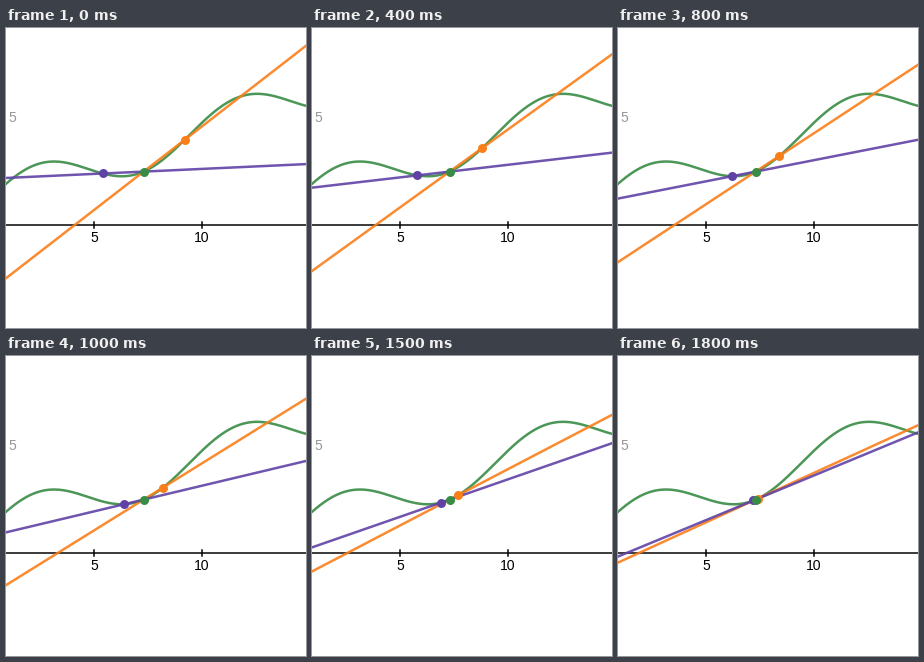
A matplotlib script that plays this animation: 300 px wide and 300 px high, repeating every 1900 ms.

```python
import numpy as np
import matplotlib.pyplot as plt
from matplotlib.animation import FuncAnimation

SIZE, DPI = 300, 100
PT = 72 / DPI                      # points per pixel
FRAMES, INTERVAL = 19, 100
UNIT, X0, Y0 = 21.55, -19.7, 196.3  # pixels per unit, position of the origin
ANCHOR = 7.3
GREEN, PURPLE, ORANGE = "#388c46", "#6042a6", "#fa7e19"


def f(x):
    return x / 3 + np.sin(2 * x / 3) + 1


def px(x):
    return X0 + UNIT * x


def py(y):
    return Y0 - UNIT * y


fig = plt.figure(figsize=(SIZE / DPI, SIZE / DPI), dpi=DPI, facecolor="white")
ax = fig.add_axes([0, 0, 1, 1])
ax.set_xlim(0, SIZE)
ax.set_ylim(SIZE, 0)
ax.axis("off")


def stroke(x, y, color, width, z, alpha=1):
    return ax.plot(x, y, color=color, lw=width * PT, zorder=z, alpha=alpha)[0]


def dot(color, z):
    return ax.plot([], [], "o", color=color, ms=9 * PT, mew=0, zorder=z)[0]


def label(x, y, text, color):
    ax.text(x, y, text, color=color, fontsize=14 * PT, family="Liberation Sans",
            ha="center", va="center_baseline", zorder=2)


# Axis, ticks and labels
stroke([-5, SIZE + 5], [196.5, 196.5], "black", 1.5, 1)
for value in (5, 10):
    stroke([px(value)] * 2, [193.5, 199.5], "black", 1.5, 1)
    label(px(value), 208.5, str(value), "black")
label(6.8, 88.5, "5", "#999999")

xs = np.linspace(0.5, 15.5, 400)
stroke(px(xs), py(f(xs)), GREEN, 2.5, 3, 0.9)

ends = np.array([0.5, 15.5])
secants = [
    (1, stroke([], [], ORANGE, 2.5, 4, 0.9), dot(ORANGE, 6)),
    (-1, stroke([], [], PURPLE, 2.5, 5, 0.9), dot(PURPLE, 7)),
]
dot(GREEN, 8).set_data([px(ANCHOR)], [py(f(ANCHOR))])


def update(i):
    gap = (FRAMES - i) / 10
    for side, line, point in secants:
        x = ANCHOR + side * gap
        slope = (f(x) - f(ANCHOR)) / (x - ANCHOR)
        line.set_data(px(ends), py(f(ANCHOR) + slope * (ends - ANCHOR)))
        point.set_data([px(x)], [py(f(x))])
    return [artist for _, *pair in secants for artist in pair]


anim = FuncAnimation(fig, update, frames=FRAMES, interval=INTERVAL,
                     repeat=True, repeat_delay=0, blit=False)
plt.show()
```
